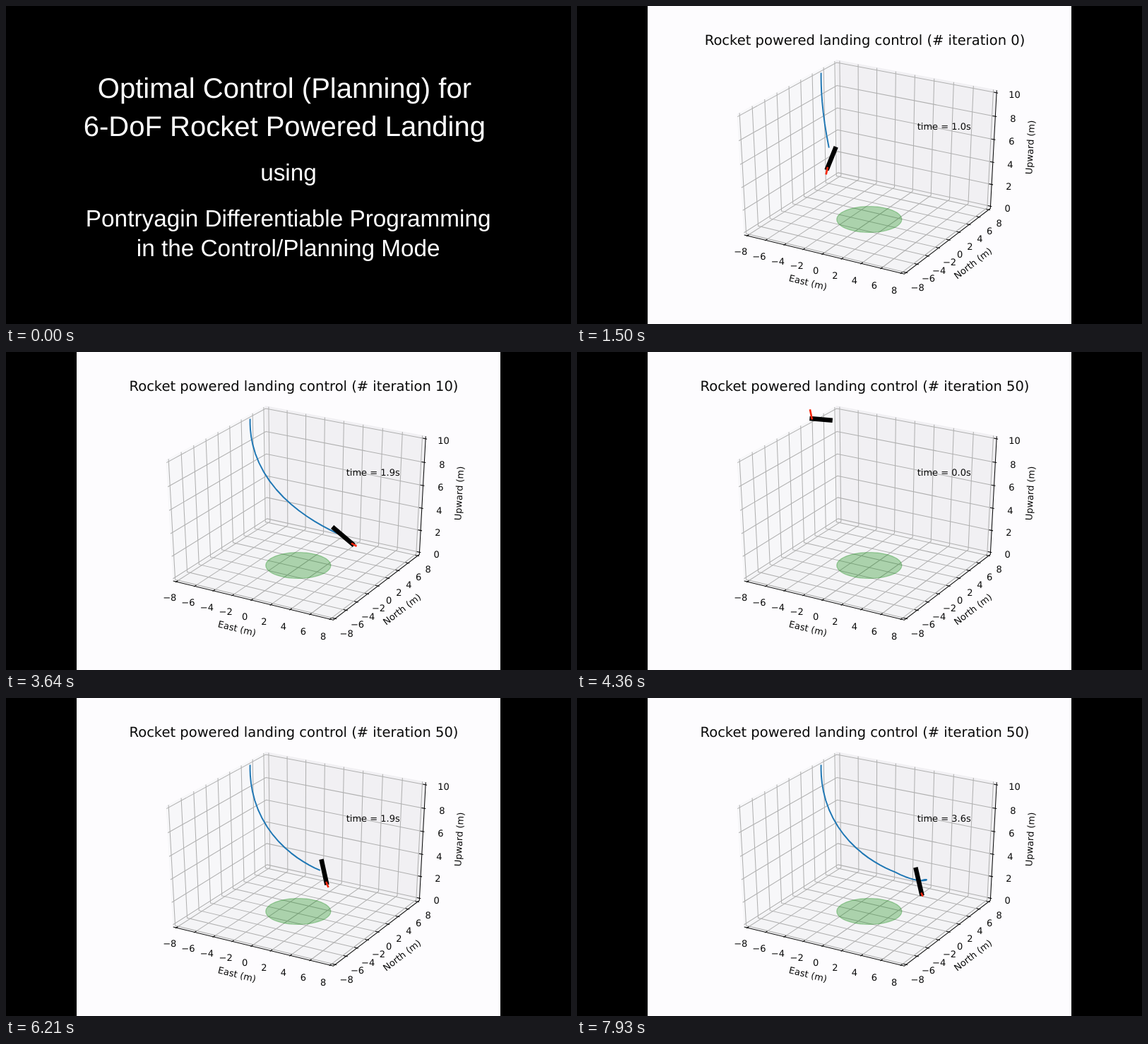
These frames come from a looping animation (800 px wide and 450 px high, 8 s). An HTML page:

```html
<!DOCTYPE html>
<html lang="en">
<head>
<meta charset="utf-8">
<title>Rocket powered landing</title>
<style>
html, body { margin: 0; width: 100%; height: 100%; overflow: hidden; background: #000; }
svg { display: block; width: 100vw; height: 100vh; }
text { text-rendering: geometricPrecision; text-anchor: middle; }
#intro text { font-family: "Liberation Sans", Arial, sans-serif; fill: #fff; }
#plot text { font: 13.02px "DejaVu Sans", sans-serif; fill: #0a0a0a; }
#plot #title { font-size: 19.53px; }
#plot #clock { text-anchor: start; }
.grid { stroke: #b0b0b0; stroke-width: 1.04; fill: none; }
.axis { stroke: #0a0a0a; stroke-width: 1.04; }
</style>
</head>
<body>
<svg viewBox="0 0 800 450">
  <rect width="800" height="450"/>
  <g id="intro">
    <text x="394.4" y="130" font-size="40">Optimal Control (Planning) for</text>
    <text x="394.4" y="184" font-size="40">6-DoF Rocket Powered Landing</text>
    <text x="400" y="247" font-size="33.33">using</text>
    <text x="399.7" y="312" font-size="33.33">Pontryagin Differentiable Programming</text>
    <text x="399.7" y="354" font-size="33.33">in the Control/Planning Mode</text>
  </g>
  <g id="plot">
    <rect x="100" width="600" height="450" fill="#fdfcfe"/>
    <g id="scene"></g>
    <text id="title" x="407.5" y="55.4"></text>
    <text id="clock" x="481.7" y="175"></text>
    <polyline id="trail" fill="none" stroke="#1f77b4" stroke-width="1.95" stroke-linejoin="round" stroke-linecap="square"/>
    <line id="rocket" stroke="#000" stroke-width="6.5" stroke-linecap="square"/>
    <line id="flame" stroke="#f7260b" stroke-width="2.6" stroke-linecap="square"/>
  </g>
</svg>
<script>
const $ = id => document.getElementById(id);
const scene = $('scene');

function set(el, attrs) {
  for (const name in attrs) el.setAttribute(name, attrs[name]);
}
function add(tag, attrs, text = '') {
  const el = document.createElementNS('http://www.w3.org/2000/svg', tag);
  set(el, attrs);
  el.textContent = text;
  scene.append(el);
}

// Perspective view of the 16 x 16 x 10 m box: azimuth -60, elevation 30.
const C = Math.sqrt(3) / 2;
function project([x, y, z]) {
  x /= 16; y /= 16; z = (z - 5) / 10;
  const depth = 10 - (C * x / 2 - 0.75 * y + z / 2);
  const right = C * x + y / 2, up = -x / 4 + C * y / 2 + C * z;
  return [413.8 + 2513 * right / depth, 222.6 - 1873 * up / depth];
}
const path = pts => pts.map(p => project(p).map(v => v.toFixed(2)).join()).join(' ');
const line = (cls, ...pts) => add('polyline', { class: cls, fill: 'none', points: path(pts) });
const pane = (color, ...pts) => add('polygon', { points: path(pts), fill: color, stroke: color });
function label(text, x, y, angle = 0) {
  add('text', { transform: `translate(${x} ${y}) rotate(${angle})`, y: 4.7 }, text);
}
const tickLabel = (value, pos) => label(String(value).replace('-', '\u2212'), ...project(pos));

// Pane limits lie slightly beyond the data; ticks cross the axis by IN and OUT.
const H = 8 + 1 / 3, LO = -0.208, HI = 10.208, OUT = 0.139, IN = 0.278;

pane('#f7f7f9', [-H, -H, LO], [-H, H, LO], [-H, H, HI], [-H, -H, HI]);
pane('#f1f0f3', [-H, H, LO], [H, H, LO], [H, H, HI], [-H, H, HI]);
pane('#f4f4f6', [-H, -H, LO], [H, -H, LO], [H, H, LO], [-H, H, LO]);

for (let v = -8; v <= 8; v += 2) {
  line('grid', [v, -H, LO], [v, H, LO], [v, H, HI]);
  line('grid', [H, v, LO], [-H, v, LO], [-H, v, HI]);
}
for (let z = 0; z <= 10; z += 2) line('grid', [-H, -H, z], [-H, H, z], [H, H, z]);

line('axis', [-H, -H, LO], [H, -H, LO], [H, H, LO], [H, H, HI]);
for (let v = -8; v <= 8; v += 2) {
  line('axis', [v, -H + IN, LO], [v, -H - OUT, LO]);
  line('axis', [H - IN, v, LO], [H + OUT, v, LO]);
  tickLabel(v, [v, -H - 1.18, LO - 1.04]);
  tickLabel(v, [H + 1.15, v, LO - 1.04]);
}
for (let z = 0; z <= 10; z += 2) {
  line('axis', [H - IN, H, z], [H + OUT, H, z]);
  tickLabel(z, [H + 1.6, H + 0.36, z]);
}
label('East (m)', 327, 391, 13.7);
label('North (m)', 560.5, 364, -37.5);
label('Upward (m)', 641.5, 200, -87);

const pad = Array.from({ length: 72 }, (_, i) => {
  const a = i * Math.PI / 36;
  return [3 * Math.cos(a), 3 * Math.sin(a), 0];
});
add('polygon', { points: path(pad), fill: 'green', 'fill-opacity': 0.3, stroke: 'green', 'stroke-opacity': 0.3, 'stroke-width': 1.3 });

// Each run follows a Bezier descent; hover is a second curve for the rest of the flight.
const START = [345.6, 95.4];
const DESCENT = 1.9, HOVER = 1.7;
const RUNS = [
  { iteration: 0, from: 0, turn: 130, pace: 1.1, stretch: 3,
    descent: [START, [345, 180], [370, 255], [390, 325]] },
  { iteration: 10, from: 9, turn: 152, pace: 1.09, stretch: 4,
    descent: [START, [344, 172], [402, 228], [477.5, 260.5]] },
  { iteration: 50, from: 27, turn: 108, pace: 0.83, stretch: 2.4,
    descent: [START, [344, 176], [398, 226], [450.5, 246.3]],
    hover: [[450.5, 246.3], [495, 270], [506, 250], [484, 259.8]] }
];

function bezier([a, b, c, d], s) {
  const r = 1 - s;
  return [0, 1].map(i => r * r * r * a[i] + 3 * r * r * s * b[i] + 3 * r * s * s * c[i] + s * s * s * d[i]);
}
function position(run, t) {
  if (run.hover && t > DESCENT) return bezier(run.hover, (t - DESCENT) / HOVER);
  // Free fall at first, then braking; reaches 1 at t = DESCENT.
  return bezier(run.descent, 1.62 * t * t / (t * t + 2.24));
}
function polar(degrees, length) {
  const a = degrees * Math.PI / 180;
  return [Math.cos(a) * length, -Math.sin(a) * length];
}

function drawRun(step) {
  const run = RUNS.filter(r => r.from <= step).pop();
  const tenths = Math.round((step - run.from) * 10 / 7);
  const t = tenths / 10;

  const [x, y] = position(run, t);
  const angle = -5 + run.turn * (1 - Math.exp(-((t / run.pace) ** 2)));
  const [dx, dy] = polar(angle, (26 + run.stretch * t) / 2);
  const gimbal = 10 - 83 * Math.exp(-6 * t);
  const [fx, fy] = polar(angle + 180 + gimbal, 12 * Math.exp(-t / 2.7));
  const trail = Array.from({ length: tenths }, (_, i) => position(run, i / 10).join());

  $('title').textContent = `Rocket powered landing control (# iteration ${run.iteration})`;
  $('clock').textContent = `time = ${t.toFixed(1)}s`;
  set($('trail'), { points: trail.length > 1 ? trail.join(' ') : '' });
  set($('rocket'), { x1: x - dx, y1: y - dy, x2: x + dx, y2: y + dy });
  set($('flame'), { x1: x - dx, y1: y - dy, x2: x - dx + fx, y2: y - dy + fy });
}

// Seven pictures a second, on a 10 ms clock.
const LOOP = 8000, INTRO = 500;
const stepStart = k => 10 * Math.floor(k * 100 / 7 + 0.4);
function stepAt(ms) {
  const k = Math.floor((ms + 10) * 7 / 1000);
  return ms < stepStart(k) ? k - 1 : k;
}

const origin = performance.now();
let shown;
function frame() {
  const ms = (performance.now() - origin) % LOOP;
  const step = ms < INTRO ? -1 : Math.min(52, stepAt(ms - INTRO));
  if (step !== shown) {
    shown = step;
    $('intro').style.display = step < 0 ? '' : 'none';
    $('plot').style.display = step < 0 ? 'none' : '';
    if (step >= 0) drawRun(step);
  }
  requestAnimationFrame(frame);
}
frame();
</script>
</body>
</html>
```
